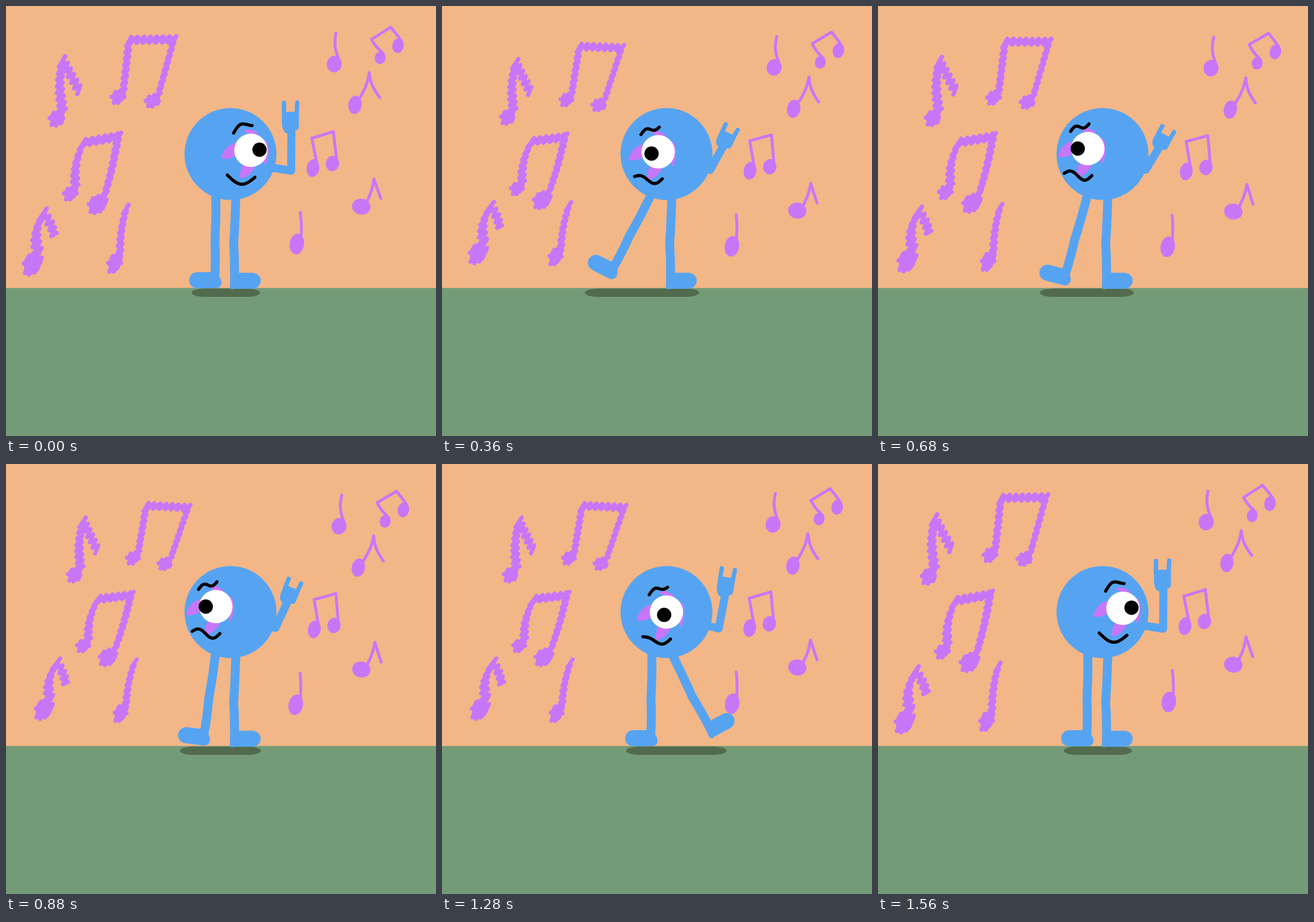
Recreate the animation shown at these times as an HTML page with a canvas. Size 748 by 748 pixels, loop 1600 ms.

```html
<!DOCTYPE html>
<html>
<head>
<meta charset="utf-8">
<style>
  html, body { margin: 0; width: 100%; height: 100%; overflow: hidden; background: #f3b687; }
  canvas { display: block; }
</style>
</head>
<body>
<canvas id="stage" width="748" height="748"></canvas>
<script>
const ctx = document.getElementById('stage').getContext('2d');
const PURPLE = '#c876f8', BLUE = '#56a4f1';
const STEP = 40, STEPS = 40, HORIZON = 490.5;
const { PI, sin, cos, round, max, sqrt, hypot } = Math;
ctx.lineCap = ctx.lineJoin = 'round';

const lerp = (a, b, t) => a + (b - a) * t;
const ramp = (s, from, to) => Math.min(1, max(0, (s - from) / (to - from)));
// Rises from 0 to 1, holds, falls back to 0
const pulse = (s, start, full, fade, end) => ramp(s, start, full) - ramp(s, fade, end);

const motion = s => ({
  sway: pulse(s, 0, 7.7, 7.7, 15.5) + pulse(s, 15.5, 22, 22, 32) + pulse(s, 22, 32, 32, 39),
  glance: pulse(s, 0, 11, 27, 39),
  arm: pulse(s, 0, 12, 12, 39),
  left: 31 * pulse(s, 0, 6, 6, 27),
  right: 28 * pulse(s, 26, 32, 32, 39),
});
// The third beat only dips halfway before the next one
const dip = s => s > 22 && s < 32 ? .5 + Math.abs(s - 27) / 10 : motion(s).sway;

// A set of notes; amp 0 draws smooth lines, otherwise slanted scribbles
class Notes {
  strokes = new Path2D();
  solids = new Path2D();

  line([x0, y0], [x1, y1], amp = 0, bow = 0) {
    const n = max(3, round(hypot(x1 - x0, y1 - y0) / 5.7));
    for (let k = 0; k <= n; k++) {
      const u = k / n, side = k % 2 ? -amp : amp;
      this.strokes[k ? 'lineTo' : 'moveTo'](
        lerp(x0, x1, u) + bow * sin(PI * u) + side, lerp(y0, y1, u) - 1.3 * side);
    }
  }
  // Draws a head and returns where its stem starts
  head([x, y, rx, ry], amp) {
    const inset = amp ? 4 : 0;
    this.solids.moveTo(x, y);
    this.solids.ellipse(x, y, rx - inset, ry - inset, .15, 0, 7);
    for (let u = -1, side = 1; amp && u <= 1; u += 5 / rx, side = -side) {
      const h = side * (ry - inset) * sqrt(1 - u * u);
      this.strokes.moveTo(x + u * (rx - inset), y);
      this.strokes.lineTo(x + u * (rx - inset) - .35 * h, y + h);
    }
    return [x + .6 * rx, y - .6 * ry];
  }
  single(head, top, { flag, amp, bow, flagBow } = {}) {
    this.line(top, this.head(head, amp), amp, bow);
    if (flag) this.line(top, flag, amp && 4, flagBow);
  }
  pair(headA, headB, topA, topB, { amp, bow } = {}) {
    this.line(topA, this.head(headA, amp), amp, bow);
    this.line(topA, topB, amp);
    this.line(topB, this.head(headB, amp), amp, -bow / 3 || 0);
  }
  draw(width) {
    fill(PURPLE, this.solids);
    stroke(PURPLE, width, this.strokes);
  }
}

const scribbled = new Notes();
scribbled.single([89, 195, 17, 17], [98, 94], { flag: [128, 148], amp: 5, bow: -5 });
scribbled.pair([195, 158, 15, 15], [255, 165, 16, 14], [214, 59], [292, 58], { amp: 4 });
scribbled.pair([112, 326, 15, 15], [159, 345, 19, 19], [134, 238], [195, 227], { amp: 5, bow: -6 });
scribbled.single([46, 448, 19, 23], [65, 360], { flag: [84, 400], amp: 6, bow: -9, flagBow: 3 });
scribbled.single([189, 447, 15, 20], [209, 351], { amp: 4, bow: -3 });

const smooth = new Notes();
smooth.single([571, 101, 13, 14.5], [574, 47], { bow: -4 });
smooth.pair([651, 90, 9.5, 11], [682, 69, 10, 13], [636, 58], [669, 37], { bow: -2 });
smooth.single([607, 172, 11.5, 16], [632, 116], { flag: [650, 159], bow: 3, flagBow: -4 });
smooth.pair([534, 282, 11, 15.5], [568, 274, 11.5, 13.5], [532, 230], [569.5, 218.5]);
smooth.single([618, 349, 16, 14], [640, 301], { flag: [652, 335], bow: 2 });
smooth.single([506, 414, 12.5, 18], [512, 359], { bow: 1 });

const leftLeg = new Path2D('M365 320 Q366 365 363.5 410 Q365 440 363 474');
const leftFoot = new Path2D('M333 463 H358 Q375 469 375 482 Q374 491 363 491 H335 C313 492 314 463 333 463');
const rightLeg = new Path2D('M400 320 Q399 370 396 415 Q398 440 397.5 483');
const rightFoot = new Path2D('M397 464 H427 C449 464 448 492 427 492 H397 Q389 495 389 486 Z');
const palm = new Path2D('M-15 17 V39 Q-13 55 -4 55 L8 50 Q15 49 14.5 41 V17 Z');
const prongs = new Path2D('M-11.5 1.5 V23 M11.5 1 L10.5 23');
const eyePaint = new Path2D(`M-52 14 Q-46 -9 -26 -13 L-24 8 Q-40 18 -52 14
  M-13 -35 Q4 -41 16 -24 L-2 -26 Z
  M24 -18 Q32 -14 31 4 Q30 18 25 26 Q20 20 24 10 Z
  M-14 24 Q-20 40 -20 48 Q-4 50 8 27 Z`);

function fill(color, path) { ctx.fillStyle = color; ctx.fill(path); }
function stroke(color, width, path) {
  ctx.strokeStyle = color;
  ctx.lineWidth = width;
  ctx.stroke(path);
}
function disc(color, x, y, r) {
  const path = new Path2D();
  path.arc(x, y, r, 0, 7);
  fill(color, path);
}
function group(draw) { ctx.save(); draw(); ctx.restore(); }
function rotateAt(x, y, angle) {
  ctx.translate(x, y);
  ctx.rotate(angle);
  ctx.translate(-x, -y);
}

// Line between two points, bent by an arch and a full wave
function squiggle(x0, y0, x1, y1, arch, wave) {
  const path = new Path2D();
  for (let u = 0; u <= 1; u += 1 / 16) {
    path.lineTo(lerp(x0, x1, u), lerp(y0, y1, u) + arch * sin(PI * u) + wave * sin(2 * PI * u));
  }
  stroke('#000', 5.5, path);
}

function drawNotes(sway, turn) {
  group(() => {
    const size = 1 - .067 * sway, skew = .055 * sway;
    ctx.transform(size, skew, -skew, size, 47.6 * sway, 5.6 * sway);
    scribbled.draw(7.5);
  });
  group(() => {
    rotateAt(360, 355, .033 * turn);
    smooth.draw(5);
  });
}

function drawLeg(x, y, degrees, leg, foot) {
  group(() => {
    rotateAt(x, y, degrees * PI / 180);
    stroke(BLUE, 15.5, leg);
    fill(BLUE, foot);
  });
}

// The raised arm tilts away and foreshortens
function drawArm(r) {
  const angle = .6 * r, length = 1 - .3 * r, x = 495 + 13 * r, y = 167 + 56 * r;
  const arm = new Path2D();
  arm.moveTo(455, 280);
  arm.lineTo(496 - 65 * r + 34 * r * r, 286.5 - 2 * r);
  arm.lineTo(x - 46 * length * sin(angle) + 1.5, y + 46 * length * cos(angle));
  stroke(BLUE, 14, arm);
  group(() => {
    ctx.translate(x, y);
    ctx.rotate(angle);
    ctx.scale(1, length);
    fill(BLUE, palm);
    stroke(BLUE, 7.5, prongs);
  });
}

function drawFace(q) {
  const arc = q * (1 - q);
  group(() => {
    ctx.translate(426 - 61 * q, 251 - 3 * q + 34 * arc);
    fill(PURPLE, eyePaint);
    disc('#fff', 0, 0, 29);
    disc('#000', 15 - 32.5 * q, -1 + q + 22 * arc, 12.4);
    squiggle(-30, -30, 2, -43, lerp(-9.5, -1, q), lerp(-2, -4.5, q));
    squiggle(-41, 43, 7, 47, lerp(14, 3, q), -7 * q);
  });
}

function drawShadow(left, right) {
  const x0 = 323 - 2.8 * left - .1 * right, x1 = 442 + .2 * left + 1.9 * right;
  const path = new Path2D();
  path.roundRect(x0, 491.5, x1 - x0, 14.5, { x: 24, y: 7.2 });
  fill('#526b4e', path);
}

function render(now) {
  const s = Math.floor(now / STEP) % STEPS;
  const { glance, arm, left, right } = motion(s);
  ctx.fillStyle = '#f3b687';
  ctx.fillRect(0, 0, 748, 748);
  ctx.fillStyle = '#749b77';
  ctx.fillRect(0, HORIZON, 748, 748);
  drawNotes(dip(s), glance);
  drawShadow(left, right);
  drawLeg(364, 325, left, leftLeg, leftFoot);
  drawLeg(400, 330, -right, rightLeg, rightFoot);
  drawArm(arm);
  disc(BLUE, 390.5, 257.5, 80);
  drawFace(glance);
  requestAnimationFrame(render);
}
requestAnimationFrame(render);
</script>
</body>
</html>
```
